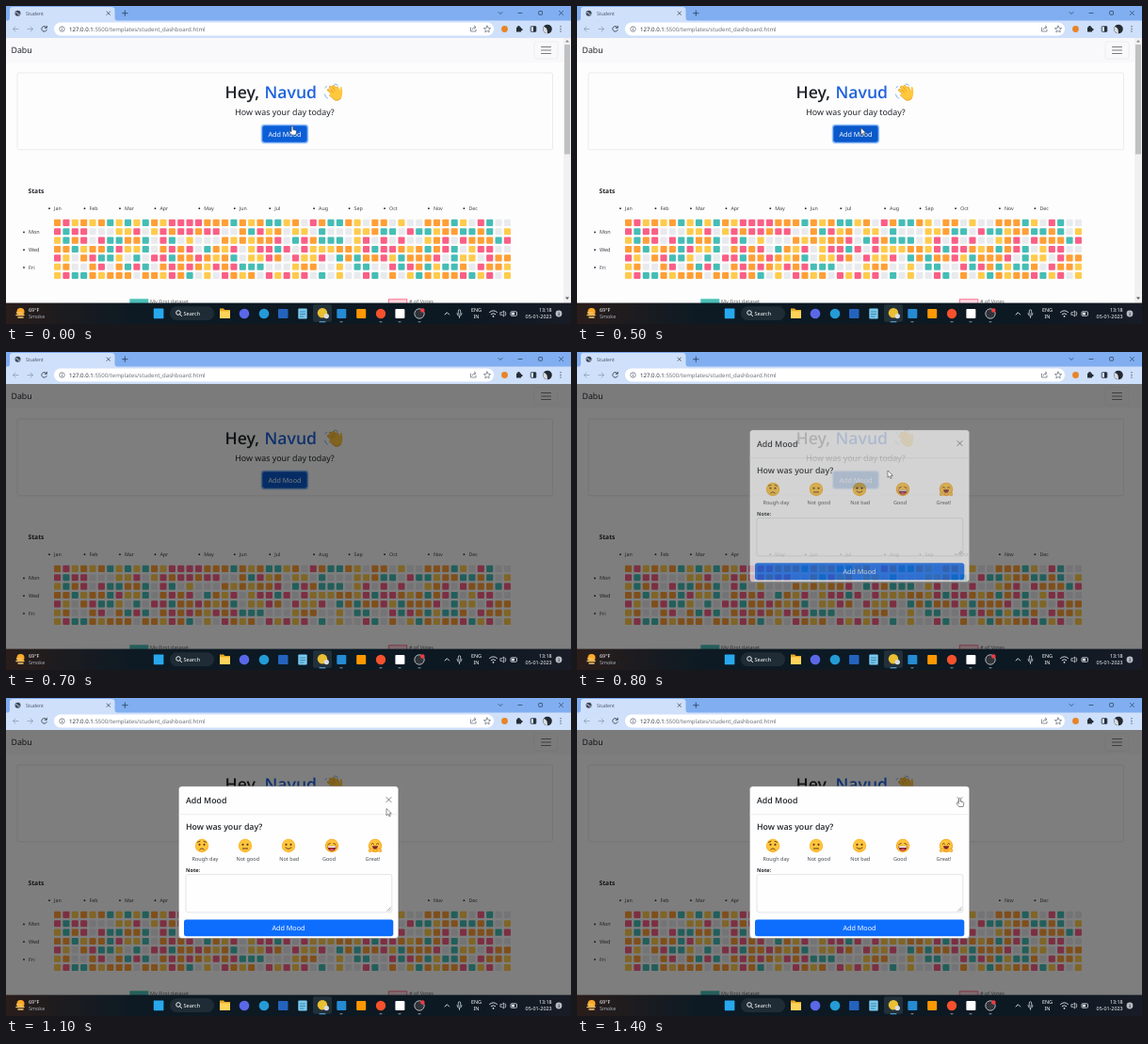
Recreate the animation shown at these times as an HTML page. Size 600 by 338 pixels, loop 1.5 s.

```html
<!DOCTYPE html>
<html lang="en">
<head>
<meta charset="utf-8">
<title>Student</title>
<style>
html, body { margin: 0; width: 100%; height: 100%; overflow: hidden; background: #fff; }
svg { display: block; width: 100vw; height: 100vh; font-family: "Noto Sans", "Open Sans", sans-serif; text-rendering: geometricPrecision; }
.head { font-family: "Open Sans", "Noto Sans", sans-serif; font-weight: 600; }
</style>
</head>
<body>
<svg id="stage" viewBox="0 0 600 338"></svg>
<script>
const rect = (x, y, w, h, fill, r = 0, more = '') =>
  `<rect x="${x}" y="${y}" width="${w}" height="${h}" rx="${r}" fill="${fill}" ${more}/>`;
const dot = (x, y, r, fill, more = '') => `<circle cx="${x}" cy="${y}" r="${r}" fill="${fill}" ${more}/>`;
const line = (d, color, w = 1, more = '') =>
  `<path d="${d}" fill="none" stroke="${color}" stroke-width="${w}" stroke-linecap="round" stroke-linejoin="round" ${more}/>`;
const shape = (d, fill, more = '') => `<path d="${d}" fill="${fill}" ${more}/>`;
const text = (x, y, s, size, fill = '#212529', more = '') =>
  `<text x="${x}" y="${y}" font-size="${size}" fill="${fill}" ${more}>${s}</text>`;
const mid = 'text-anchor="middle"', end = 'text-anchor="end"';
const head = 'class="head"', bold = 'font-weight="700"';

function browser() {
  const ink = '#5d6878';
  return rect(0, 0, 600, 16, '#80aef0') +
    shape('M1 16Q4 16 4 12V4Q4 1 7 1H112Q115.500 1 115.500 4V12Q115.500 16 119 16Z', '#cfe0fb') +
    dot(12.5, 7.7, 3, '#3c4654') + line('M10.500 7Q12 6 12.500 8T14.500 9', '#cfe0fb', .9) +
    text(21, 9.8, 'Student', 5.1, '#4a5463') +
    line('M107 6l3.400 3.400M110.400 6l-3.400 3.400', '#3c4654', .8) +
    line('M123.500 7.700h5.600M126.300 4.900v5.600', '#26415f', .8) +
    line('M523 6.500l2 2 2-2M544 7.500h4M587.500 5.500l4 4M591.500 5.500l-4 4', '#253a58', .7) +
    rect(565.7, 5.5, 3.8, 3.8, 'none', .6, 'stroke="#253a58" stroke-width=".7"') +
    rect(0, 15.5, 600, 18.5, '#cfe0fb') +
    rect(51, 17.5, 467, 14, '#fff', 7) +
    line('M13 24.500H7.500M10 22l-2.500 2.500 2.500 2.500M23 24.500h5.500M26 22l2.500 2.500-2.500 2.500', '#8f9db3', .8) +
    line('M43 22.800A2.800 2.800 0 1 0 43.200 25.500M43.300 21.300v2h-2', '#39434f', .9) +
    dot(59.5, 24.5, 2.7, 'none', 'stroke="#59636f" stroke-width=".7"') +
    line('M59.500 24.300v1.600M59.500 22.900v.1', '#59636f', .7) +
    text(67, 26.6, '127.0.0.1<tspan fill="#6c7178">:5500/templates/student_dashboard.html</tspan>', 6.08, '#2b3038') +
    line('M493.500 23v4h5.500v-2M495 25Q495.500 22.500 498.500 22.500M497.300 21l1.700 1.500-1.700 1.500', ink, .7) +
    line('M511 21l1.100 2.300 2.500.3-1.900 1.700.5 2.500-2.200-1.200-2.200 1.200.5-2.500-1.900-1.700 2.500-.3Z', ink, .7) +
    dot(529.5, 24.5, 3.4, '#e88427') +
    rect(542, 22.5, 5, 5, '#262d36', .6) + dot(544.5, 22.3, 1.3, '#262d36') + dot(547.3, 25, 1.3, '#262d36') +
    rect(557.2, 21.7, 5.6, 5.6, 'none', .7, 'stroke="#262d36" stroke-width=".8"') + rect(560, 21.7, 2.8, 5.6, '#262d36') +
    dot(575, 24.5, 4.8, '#242a31') + shape('M575 29.300A4.800 4.800 0 0 1 571 22Q575.500 23 575 29.300Z', '#d9dde2') +
    dot(589, 21.7, .75, ink) + dot(589, 24.4, .75, ink) + dot(589, 27.1, .75, ink);
}

function wave() {
  const fingers = 'M348.500 94L342.500 89.300M349.500 92L344.500 86.200M351.500 91L347.800 85.200M353.300 91L351.300 87';
  return line('M338.500 94Q338.800 97 341.500 98.200M349 83Q351.500 82.800 352.500 84.500M339 87l1.500 -1.700', '#6fa9e6', .9) +
    line(fingers, '#e49a24', 2.9) + line(fingers, '#ffc83d', 2) +
    shape('M345.500 93.500Q350 89 353.500 91Q355 92 354.700 87.500Q355.200 84.500 356.600 86.500Q358.300 94 355.800 98Q353 101.700 349.300 100Q345.500 97 343.300 94.800Q343 92.700 345.500 93.500Z', '#ffc83d') +
    line('M343.500 95Q347 98.500 349.300 100Q353.200 101.300 355.800 98', '#e49a24', .8);
}

function heatmap() {
  const step = 9.37;
  const months = 'Jan Feb Mar Apr May Jun Jul Aug Sep Oct Nov Dec'.split(' ');
  const weeks = [0, 4, 8, 12, 17, 21, 25, 30, 34, 38, 43, 47];
  const shades = { O: '#ff9f36', Y: '#ffcb4d', T: '#45bdb5', P: '#fa5f85', G: '#e9eaed' };
  const mix = 'OOOOOYYYYTTTTPPPGGGG';
  let seed = 4217, out = '';
  const random = () => (seed = seed * 16807 % 2147483647) / 2147483647;
  months.forEach((m, i) => {
    const x = 51 + step * weeks[i];
    out += dot(x - 5, 215.2, .9, '#212529') + text(x, 217.2, m, 5.3, '#3c4045');
  });
  ['Mon', 'Wed', 'Fri'].forEach((d, i) => {
    const y = 242.4 + i * step * 2;
    out += dot(19, y - 2, .9, '#212529') + text(24, y, d, 5.5, '#3c4045');
  });
  for (let c = 0; c < 52; c++)
    for (let r = 0; r < 7; r++)
      out += rect((51 + c * step).toFixed(2), (226.8 + r * step).toFixed(2), 7.1, 7.1, shades[mix[Math.floor(random() * mix.length)]], 1);
  return out;
}

function page() {
  return rect(0, 34, 600, 282, '#fdfdfe') + rect(0, 33.5, 600, 26.5, '#f9f8fa') +
    text(5.5, 50.4, 'Dabu', 8.8) +
    rect(561, 37.8, 25, 18.4, 'none', 2.5, 'stroke="#e6e6e8" stroke-width=".6"') +
    line('M568.500 43.500h10M568.500 47h10M568.500 50.500h10', '#6b6d70', .9) +
    rect(12, 71, 568.5, 81.8, '#fdfdfe', 2, 'stroke="#e3e3e5" stroke-width=".7"') +
    text(232.5, 98.3, 'Hey,', 17.6, '#212529', head) +
    text(274.5, 98.3, 'Navud', 17.6, '#1f63dc', head) + wave() +
    text(296, 116, 'How was your day today?', 8.85, '#212529', mid) +
    rect(270.8, 125.8, 50.4, 20.4, '#8fbcf8', 3.6) +
    rect(272.3, 127.3, 47.4, 17.4, '#0b5ed7', 2.4, 'id="opener"') +
    text(296, 138.7, 'Add Mood', 7.2, '#fff', mid) +
    text(23.5, 199, 'Stats', 6.7, '#212529', bold) + heatmap() +
    rect(131.3, 311.3, 20, 6, '#4bc0b8') + text(153, 316.3, 'My First dataset', 5.5, '#666') +
    rect(406.3, 311.8, 19.5, 6, '#ffd9e2', 0, 'stroke="#ff6384" stroke-width=".9"') +
    text(428, 316.3, '# of Votes', 5.5, '#666') +
    `<g id="bar">${rect(592, 34, 8, 282, '#f1f1f1')}${rect(593, 41, 6, 116.5, '#bfc0c1')}` +
    `${shape('M594 38.500l2-2.500 2 2.500Z', '#8a8a8a')}${shape('M594 309.500l2 2.500 2-2.500Z', '#555')}</g>`;
}

function face(i) {
  const ink = '#60361b';
  const eyes = dot(-2.5, -1.2, 1.1, ink) + dot(2.5, -1.2, 1.1, ink);
  const shut = line('M-4.200 -1.300l2.400 -1.200M4.200 -1.300l-2.400 -1.200', ink, .9);
  const looks = [
    eyes + line('M-4.500 -3.700l2.500 -1M4.500 -3.700l-2.500 -1M-2.300 4Q0 1.300 2.300 4', ink, .9),
    eyes + line('M-2.600 3h5.200', ink, 1),
    eyes + line('M-3 2Q0 4.800 3 2', ink, 1),
    shut + shape('M-4.700 .5H4.700Q4 5.600 0 5.600T-4.700 .5Z', '#7b2533') + rect(-4, .6, 8, 1.3, '#fff', .4) + shape('M-2.500 4Q0 2.500 2.500 4Q0 6 -2.500 4Z', '#ef5971'),
    line('M-4 -1.700Q-2.700 -3.700 -1.400 -1.700M1.400 -1.700Q2.700 -3.700 4 -1.700', ink, .9) +
      shape('M-3 .3H3Q2.500 3.700 0 3.700T-3 .3Z', '#7b2533') +
      line('M-5.500 5.300l2.700 -1M5.500 5.300l-2.700 -1', '#e58b20', 3.3) + line('M-5.500 5.300l2.500 -1M5.500 5.300l-2.500 -1', '#ffc83d', 2.2)
  ];
  return `<g transform="translate(${208 + 46 * i} 157)">${dot(0, 0, 7.2, i < 3 ? '#fdb62f' : '#fba629')}${dot(0, -.5, 6.1, '#ffc63c')}${looks[i]}</g>`;
}

function dialog() {
  const labels = ['Rough day', 'Not good', 'Not bad', 'Good', 'Great!'];
  const centers = [211.5, 256.8, 300.7, 343, 389.5];
  return rect(183.3, 93.7, 233.5, 161.8, '#fefefe', 3.5, 'stroke="#555" stroke-width=".4"') +
    text(191, 111.6, 'Add Mood', 8.8, '#212529', head) +
    line('M404 105.600l5 5M409 105.600l-5 5', '#707376', .9) +
    line('M183.500 123.700H416.500', '#dee2e6', .6) +
    text(191, 140, 'How was your day?', 8.8, '#212529', head) +
    labels.map((s, i) => face(i) + text(centers[i], 173, s, 5.55, '#444a50', mid)).join('') +
    text(191, 185.4, 'Note:', 5.5, '#212529', bold) +
    rect(191, 187.6, 218.8, 40.2, '#fefefe', 2, 'stroke="#ced4da" stroke-width=".6"') +
    line('M404.500 226.300l3.800 -3.800M406.700 226.300l1.600 -1.600', '#777', .6) +
    rect(189, 235.4, 222.3, 17.8, '#0d6efd', 2.6) +
    text(300, 247.3, 'Add Mood', 7.2, '#fff', mid);
}

function taskbar() {
  const pale = '#e8edf3';
  return '<linearGradient id="night"><stop stop-color="#2a1d1b"/><stop offset=".22" stop-color="#0d1a24"/>' +
    '<stop offset=".8" stop-color="#0c1822"/><stop offset="1" stop-color="#181c27"/></linearGradient>' +
    rect(0, 315.6, 600, 22.4, 'url(#night)') +
    dot(15.5, 325, 4, '#ffa928') + line('M11.500 326h5M11 328.500h8M13 331h5', '#f7c469', 1.5) +
    text(24, 325, '69°F', 5.4, '#fff') + text(24, 332.3, 'Smoke', 5.4, '#aab3bd') +
    rect(156.8, 321.6, 10.6, 10.6, '#27a8ee', .6) +
    rect(174, 319.3, 47, 14.8, '#1f2c35', 7.4) +
    dot(183, 326, 2.3, 'none', 'stroke="#fff" stroke-width=".9"') + line('M184.800 327.900l1.800 1.800', '#fff', .9) +
    text(188.5, 329, 'Search', 5.6, '#fff') +
    shape('M227 321.500h4l1.500 1.500h5.500v9h-11Z', '#e9a922') + rect(227, 324.3, 11, 7.7, '#ffd35a', .6) +
    dot(253, 327, 5.3, '#5a68e8') + dot(274, 327, 5.3, '#249bd6') + rect(289, 322, 10.5, 10, '#2463bd', 1) +
    rect(310.3, 321.5, 9.4, 11, '#79c9ef', 1) + line('M312.500 325h5M312.500 327.500h5M312.500 330h3.500', '#276b91', .7) +
    rect(326, 317.3, 20, 18.5, '#22303a', 2) + dot(336, 326.3, 5.2, '#eabf32') +
    dot(340.3, 329.6, 2.7, '#d9dde2') + rect(332.5, 335.2, 7, 1.1, '#63b7f4', .5) +
    rect(351.3, 322, 10, 10, '#258bd2', 1) + rect(372.2, 322, 10, 10, '#ff9800', 1) +
    dot(398, 327, 5.2, '#f4512c') + rect(413.4, 322, 10, 10, '#fff', 1) +
    dot(439, 327, 5.2, '#30343a', 'stroke="#cfd3d8" stroke-width=".8"') + dot(442.3, 323.5, 2.3, '#ed3b43') +
    [356, 398, 418, 439].map(x => rect(x - 1.6, 335.3, 3.2, .9, '#8c98a4', .4)).join('') +
    line('M466 328l2.300 -2.300 2.300 2.300', pale, .9) +
    rect(480.3, 322.8, 2.4, 5, 'none', 1.2, `stroke="${pale}" stroke-width=".7"`) + line('M479 326.500Q479 329.500 481.500 329.500T484 326.500M481.500 329.500v2', pale, .7) +
    text(499.5, 325, 'ENG', 5.5, '#fff', mid) + text(499.5, 332.3, 'IN', 5.5, '#fff', mid) +
    line('M513.500 325.500Q517.500 322 521.500 325.500M515.200 327.600Q517.500 325.700 519.800 327.600', pale, .9) + dot(517.5, 329.8, .9, pale) +
    line('M525.300 325.700h1.500l1.900-1.700v6l-1.900-1.700h-1.500ZM530.300 325q1.400 2 0 4', pale, .7) +
    rect(536, 324.8, 6.5, 4.5, 'none', 1, `stroke="${pale}" stroke-width=".8"`) + rect(537, 325.8, 3, 2.5, pale) +
    text(579.7, 325, '13:18', 5.4, '#fff', end) + text(579.7, 332.3, '05-01-2023', 5.4, '#fff', end) +
    dot(587, 327, 3.4, '#b9bec6') + text(587, 328.7, '3', 4.6, '#20262e', mid);
}

const arrow = shape('M0 0V7.400L1.800 5.800 3 8.400 4.200 7.900 3.100 5.300H5.400Z', '#fff', 'stroke="#333" stroke-width=".55"');
const hand = shape('M-.9 1Q0 -.7 .9 1V4L3.800 4.700Q4.700 5 4.500 6.200L3.800 9.500H-.7L-3.200 6.300Q-3 5.100 -1.800 5.700L-.9 6.300Z', '#fff', 'stroke="#333" stroke-width=".55"');

document.getElementById('stage').innerHTML = page() +
  rect(0, 33.7, 600, 282.3, '#000', 0, 'id="shade"') +
  `<g id="dialog">${dialog()}</g>` + browser() + taskbar() +
  `<g id="arrow">${arrow}</g><g id="hand">${hand}</g>`;

const el = id => document.getElementById(id);
const ui = Object.fromEntries(['opener', 'bar', 'shade', 'dialog', 'arrow', 'hand'].map(id => [id, el(id)]));
const clamp = v => Math.max(0, Math.min(1, v));
const show = (node, on) => node.setAttribute('visibility', on ? 'visible' : 'hidden');

// time, x, y of the pointer tip
const path = [[0, 304, 127.5], [100, 302.5, 128.5], [500, 301.5, 129.5], [600, 301.5, 129.5],
  [800, 330, 126], [900, 358.5, 121.5], [1000, 387, 119], [1100, 404, 117.5], [1200, 406, 113], [1300, 406.3, 106], [1500, 406.3, 106]];

function pointer(t) {
  const i = path.findIndex((p, n) => n === path.length - 1 || t < path[n + 1][0]);
  const a = path[i], b = path[Math.min(i + 1, path.length - 1)];
  const u = b === a ? 0 : (t - a[0]) / (b[0] - a[0]);
  return [a[1] + (b[1] - a[1]) * u, a[2] + (b[2] - a[2]) * u];
}

function draw(now) {
  const t = Math.floor((now % 1500) / 100) * 100;
  ui.shade.setAttribute('opacity', .5 * clamp((t - 540) / 150));
  show(ui.bar, t < 600);
  ui.opener.setAttribute('fill', t < 300 ? '#0b5ed7' : '#0a58ca');

  const slide = -22 * Math.pow(1 - clamp((t - 700) / 300), 1.7);
  ui.dialog.setAttribute('transform', `translate(0 ${slide})`);
  ui.dialog.setAttribute('opacity', clamp((t - 700) / 150));

  const linkHover = t < 500 || t >= 1300;
  const at = `translate(${pointer(t).join(' ')})`;
  ui.arrow.setAttribute('transform', at);
  ui.hand.setAttribute('transform', at);
  show(ui.arrow, !linkHover && t !== 700);
  show(ui.hand, linkHover);
}

const start = performance.now();
function tick() {
  draw(performance.now() - start);
  requestAnimationFrame(tick);
}
tick();
</script>
</body>
</html>
```
